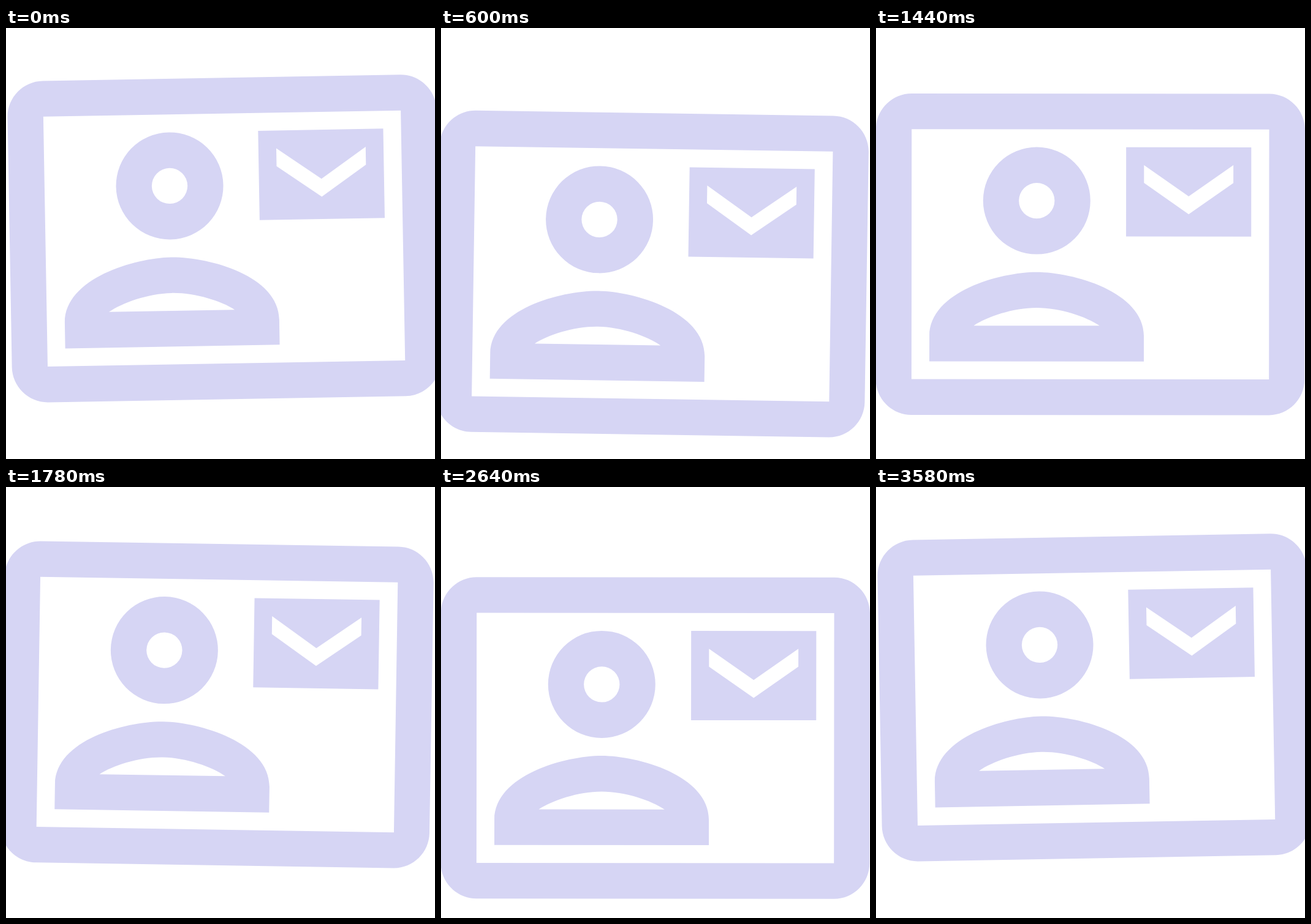
An HTML page with a canvas for the animation above (3600 ms loop, 700 by 704 pixels).

```html
<!DOCTYPE html>
<html lang="en">
<head>
<meta charset="utf-8">
<title>Swaying contact card</title>
<style>
  html, body { margin: 0; width: 100%; height: 100%; overflow: hidden; background: #fff; }
  canvas { display: block; }
</style>
</head>
<body>
<canvas id="stage" width="700" height="704"></canvas>
<script>
const ctx = document.getElementById('stage').getContext('2d');
const LOOP = 3600, STEP = 20;
const UNIT = 700 / 24;

// Card on a 24-unit grid; holes come from the even-odd rule.
const card = new Path2D([
  'M22 3H2C.9 3 0 3.9 0 5v14c0 1.1.9 2 2 2h20c1.1 0 1.99-.9 1.99-2L24 5c0-1.1-.9-2-2-2z',
  'M22 19H2V5h20z',
  'M14 6h7v5h-7z',
  'M20 8l-2.5 1.75L15 8V7l2.5 1.75L20 7z',
  'M12 9a3 3 0 1 1-6 0a3 3 0 1 1 6 0z',
  'M10 9a1 1 0 1 1-2 0a1 1 0 1 1 2 0z',
  'M15 16.59C15 14.09 11.03 13 9 13s-6 1.09-6 3.58V18h12z',
  'M5.48 16c.74-.5 2.22-1 3.52-1s2.77.49 3.52 1z'
].join(''));

// Sine-eased swing 0 -> 1 -> 0, reaching 1 at `peak` within each period.
function swing(t, period, peak) {
  const u = t % period;
  const phase = u < peak ? u / peak : 1 + (u - peak) / (period - peak);
  return (1 - Math.cos(Math.PI * phase)) / 2;
}

function draw(t) {
  const drop = 60 * swing(t, 1800, 890);
  const degrees = 2 * swing(t, 1200, 485) - 1;

  ctx.setTransform(1, 0, 0, 1, 0, 0);
  ctx.fillStyle = '#fff';
  ctx.fillRect(0, 0, 700, 704);
  ctx.translate(0, drop);
  ctx.rotate(degrees * Math.PI / 180);
  ctx.scale(UNIT, UNIT);
  ctx.fillStyle = '#d6d5f4';
  ctx.fill(card, 'evenodd');
}

const start = performance.now();
function tick() {
  const t = (performance.now() - start) % LOOP;
  draw(Math.floor(t / STEP) * STEP + STEP / 2);
  requestAnimationFrame(tick);
}
tick();
</script>
</body>
</html>
```
